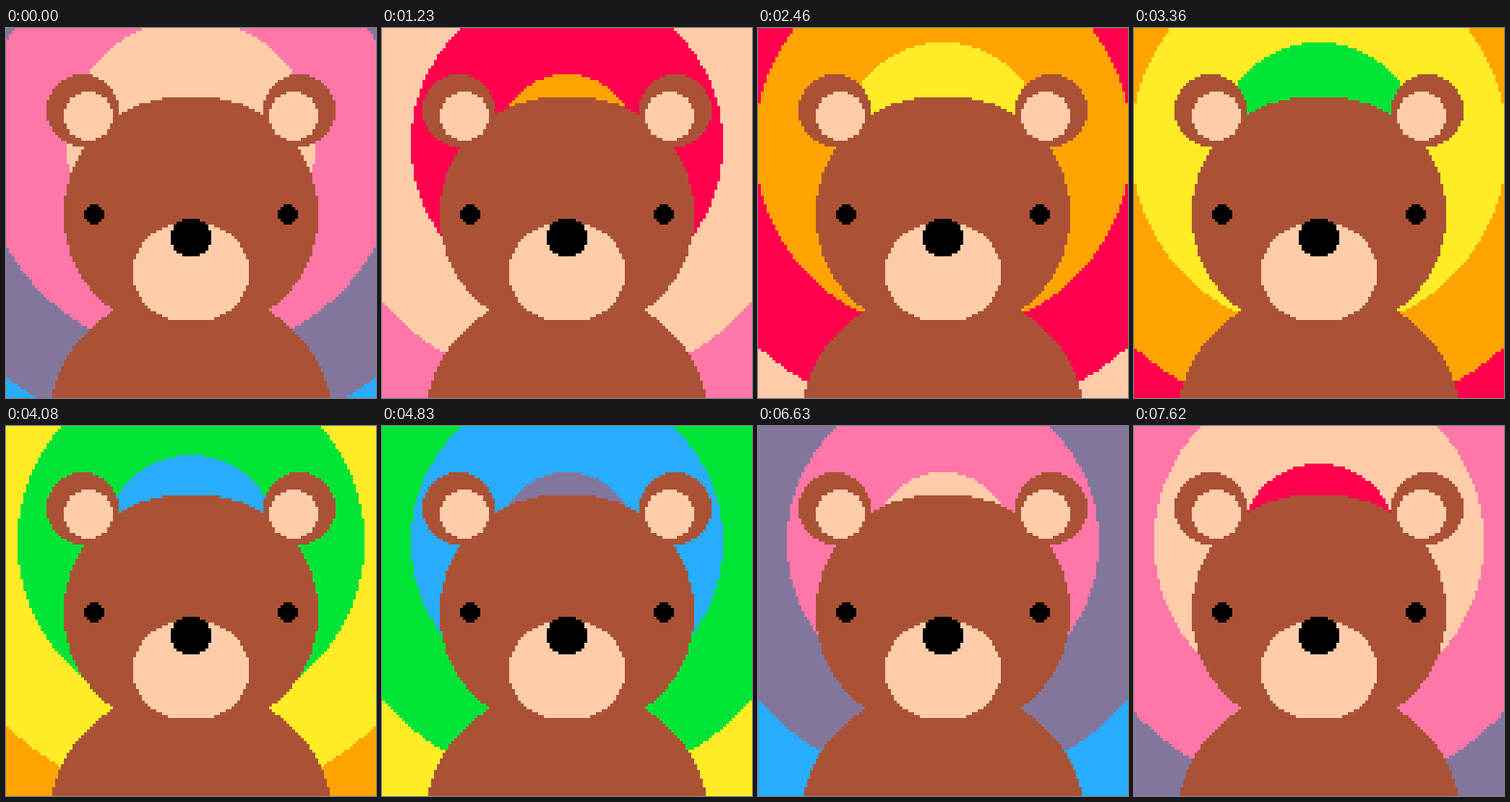
Animation of 384 by 384 pixels, one loop 7650 ms. Source, as an HTML page with a canvas:

```html
<!DOCTYPE html>
<html lang="en">
<head>
<meta charset="utf-8">
<title>Bear and rainbow rings</title>
<style>
  html, body { margin: 0; width: 100%; height: 100%; overflow: hidden; background: #000; }
  canvas { display: block; width: 384px; height: 384px; image-rendering: pixelated; }
</style>
</head>
<body>
<canvas id="stage" width="384" height="384"></canvas>
<script>
const ctx = document.getElementById('stage').getContext('2d');
const SIZE = 128, CELL = 3;
const LOOP = 7650, STEP = 30, GAP = 30;
const RINGS = ['#ff004d', '#ffa300', '#ffec27', '#00e436',
               '#29adff', '#83769c', '#ff77a8', '#ffccaa'];
const BROWN = '#ab5236', PEACH = '#ffccaa', BLACK = '#000';

// Blocky disc: every cell whose centre lies within sqrt(r2).
function blob(cx, cy, r2, color) {
  ctx.fillStyle = color;
  const r = Math.sqrt(r2);
  const top = Math.max(0, Math.ceil(cy - r));
  const bottom = Math.min(SIZE - 1, Math.floor(cy + r));
  for (let y = top; y <= bottom; y++) {
    const half = Math.sqrt(r2 - (y - cy) ** 2);
    const x0 = Math.max(0, Math.ceil(cx - half));
    const x1 = Math.min(SIZE - 1, Math.floor(cx + half));
    if (x1 >= x0) ctx.fillRect(x0 * CELL, y * CELL, (x1 - x0 + 1) * CELL, CELL);
  }
}

// Two discs mirrored about the vertical middle.
function pair(x, y, r, color) {
  blob(x, y, r * r + r, color);
  blob(SIZE - 1 - x, y, r * r + r, color);
}

function drawRings(n) {
  // The radius hurries one cell ahead every half second, then waits.
  const grow = 13 + n + (n % 15 === 1 ? 1 : 0);
  const newest = Math.floor(grow / GAP);
  const inner = grow % GAP;
  for (let i = 5; i >= 0; i--) {
    const r = inner + i * GAP;
    blob(63.5, 39.5, r * r, RINGS[(newest - i + 16) % 8]);
  }
}

function drawBear() {
  pair(59, 136, 44, BROWN);  // body
  pair(60, 64, 40, BROWN);   // head
  pair(26, 28, 12, BROWN);   // ears
  pair(28, 30, 8, PEACH);
  pair(60, 84, 16, PEACH);   // snout
  pair(63, 72, 6, BLACK);    // nose
  pair(30, 64, 3, BLACK);    // eyes
}

function frame() {
  drawRings(Math.floor((performance.now() % LOOP) / STEP));
  drawBear();
  requestAnimationFrame(frame);
}
frame();
</script>
</body>
</html>
```
